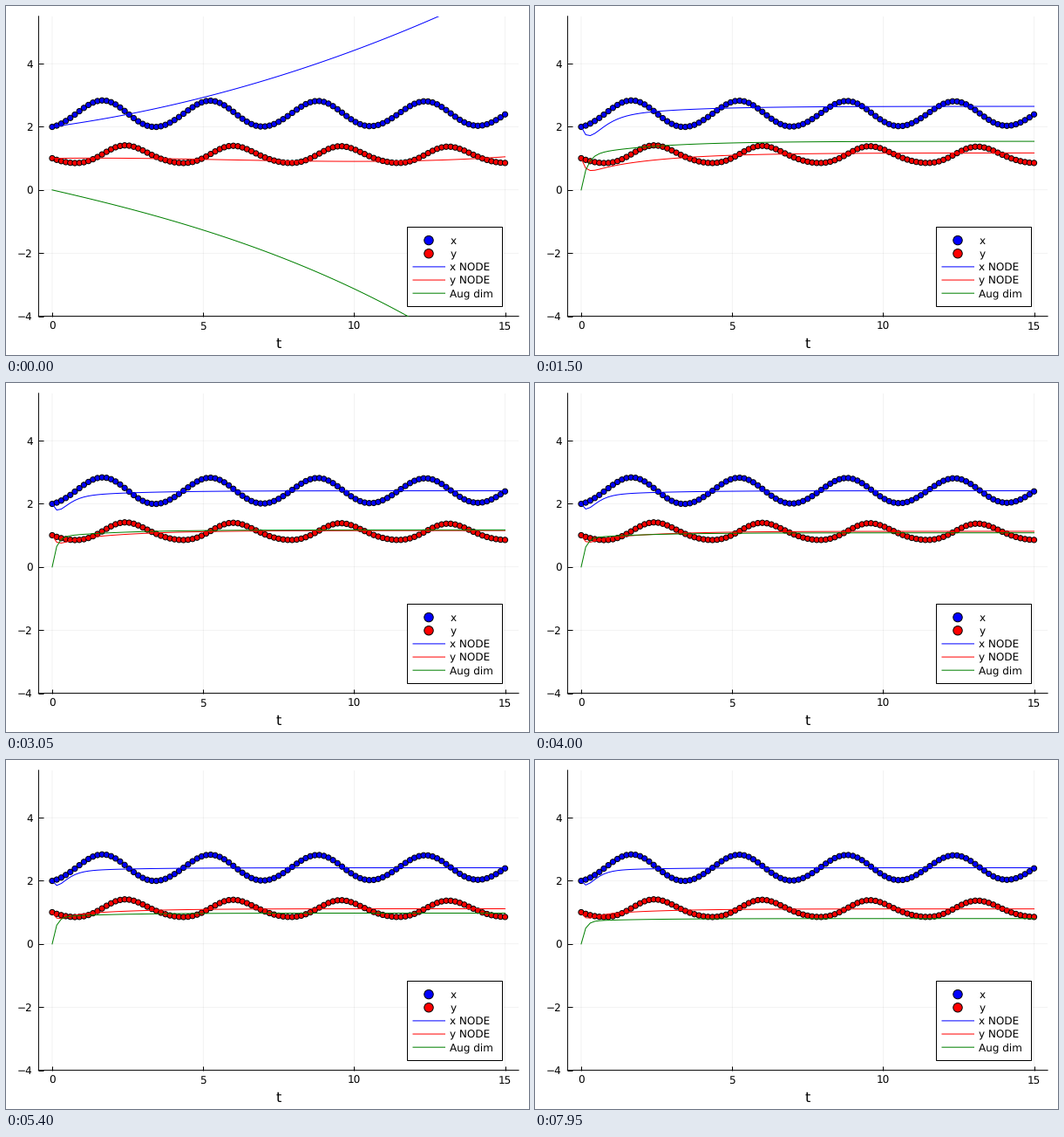
Write a matplotlib script that moves like this. It is 600 px wide and 400 px high and loops after 8000 ms.

```python
import numpy as np
import matplotlib
import matplotlib.pyplot as plt
from matplotlib.animation import FuncAnimation
from matplotlib.patches import Rectangle

W, H, DPI = 600, 400, 100
FRAMES, STEP = 160, 50
PX = 72 / DPI  # points per pixel
BLUE, RED, GREEN = "#0000ff", "#ff0000", "#008000"
WARMUP = 0.85  # seconds until the curves have taken their settled form

matplotlib.rcParams["font.family"] = "DejaVu Sans"
matplotlib.rcParams["text.hinting"] = "none"

t = np.linspace(0, 15, 101)


def wave(mid, drift, amp, peak, even, odd):
    """Slowly damped oscillation with a second harmonic."""
    th = 1.763 * (t - peak)
    fade = np.exp(-0.0073 * t)
    return (mid + drift * t + amp * fade * np.cos(th)
            + fade**2 * (even * np.cos(2 * th) + odd * np.sin(2 * th)))


def ease(u, first, last, tau, power=1):
    """Decay from first to last as training goes on."""
    return last + (first - last) * np.exp(-(u / tau) ** power)


def settle(u, start, level, slow, dip, quick):
    """Leave start quickly, then creep towards level."""
    tau = ease(u, 2.5, 2.0, 1.5)
    fast = start - level - slow + dip * t
    return level + slow * np.exp(-t / tau) + fast * np.exp(-t / quick)


def x_fit(u):
    return settle(u, 2,
                  level=ease(u, 2.97, 2.413, 0.7, 2),
                  slow=ease(u, -1.02, -0.09, 0.73, 0.6),
                  dip=-3.6, quick=ease(u, 0.46, 0.235, 0.85))


def y_fit(u):
    return settle(u, 1,
                  level=1.11 + (0.34 * u - 0.08) * np.exp(-u / 0.8),
                  slow=ease(u, -0.85, -0.22, 1.6),
                  dip=ease(u, -0.4, -1.75, 0.4), quick=0.2)


def aug_fit(u):
    return settle(u, 0,
                  level=1.28 - 0.067 * u + 0.7 * np.exp(-u / 0.78),
                  slow=ease(u, -0.76, -0.05, 1.4, 0.7),
                  dip=0, quick=ease(u, 0.31, 0.13, 0.6))


# Untrained curve, trained curve and colour of each line.
CURVES = (
    (2 + 0.13 * t + 0.0112 * t**2, x_fit, BLUE),
    (1 + 0.0138 * t - 0.0056 * t**2 + 0.000327 * t**3, y_fit, RED),
    (-0.218 * t - 0.0049 * t**2 - 0.00046 * t**3, aug_fit, GREEN),
)


def dots(axes, x, y, colors, size, edge):
    # One size per dot keeps the dots off the whole-pixel grid.
    axes.scatter(x, y, s=np.full(len(x), (size * PX) ** 2), c=colors,
                 edgecolors="black", linewidths=edge * PX, zorder=3)


fig = plt.figure(figsize=(W / DPI, H / DPI), dpi=DPI, facecolor="white")

L, R, T, B = 37.4, 588.1, 11.8, 355.6
ax = fig.add_axes([L / W, 1 - B / H, (R - L) / W, (B - T) / H])
ax.grid(color="black", alpha=0.1, linewidth=0.5 * PX)
ax.set_axisbelow(True)
ax.spines[["top", "right"]].set_visible(False)
for side in ("left", "bottom"):
    ax.spines[side].set(linewidth=PX, snap=False)
ax.tick_params(direction="in", length=5.5 * PX, width=PX,
               labelsize=12 * PX, pad=6.5 * PX)

dots(ax, t, wave(2.402, 0.0006, 0.428, 1.65, 0.010, 0.0085), BLUE, 6.2, 1)
dots(ax, t, wave(1.1125, -0.0014, 0.283, 2.47, 0.025, -0.015), RED, 6.2, 1)
lines = [ax.plot([], [], color=c, lw=PX, zorder=4)[0] for _, _, c in CURVES]

ax.set(xlim=(-0.45, 15.45), ylim=(-4, 5.5),
       xticks=[0, 5, 10, 15], yticks=[-4, -2, 0, 2, 4])
for grid_line in ax.get_xgridlines() + ax.get_ygridlines():
    grid_line.set_snap(False)

# Overlay in pixel coordinates for the legend and axis label.
top = fig.add_axes([0, 0, 1, 1])
top.axis("off")
top.text(312.5, 392, "t", fontsize=16 * PX, ha="center", va="baseline")
top.add_patch(Rectangle((460.5, 253.5), 109, 91, facecolor="white",
                        edgecolor="black", linewidth=PX, snap=False))
LABELS = ("x", "y", "x NODE", "y NODE", "Aug dim")
rows = 268.6 + 15.15 * np.arange(len(LABELS))
dots(top, [485, 485], rows[:2], [BLUE, RED], 10.4, 1)
for y, (_, _, color) in zip(rows[2:], CURVES):
    top.plot([467, 503.5], [y, y], color=color, lw=PX, snap=False)
for y, label in zip(rows, LABELS):
    top.text(509.3, y + 4.5, label, fontsize=12 * PX, va="baseline")
top.set(xlim=(0, W), ylim=(H, 0))


def update(i):
    sec = i * STEP / 1000
    u = max(0, sec - WARMUP)
    untrained = max(0, 1 - sec / WARMUP) ** 1.4
    for line, (raw, fit, _) in zip(lines, CURVES):
        line.set_data(t, untrained * raw + (1 - untrained) * fit(u))
    return lines


anim = FuncAnimation(fig, update, frames=FRAMES, interval=STEP,
                     repeat=True, repeat_delay=0)
plt.show()
```
